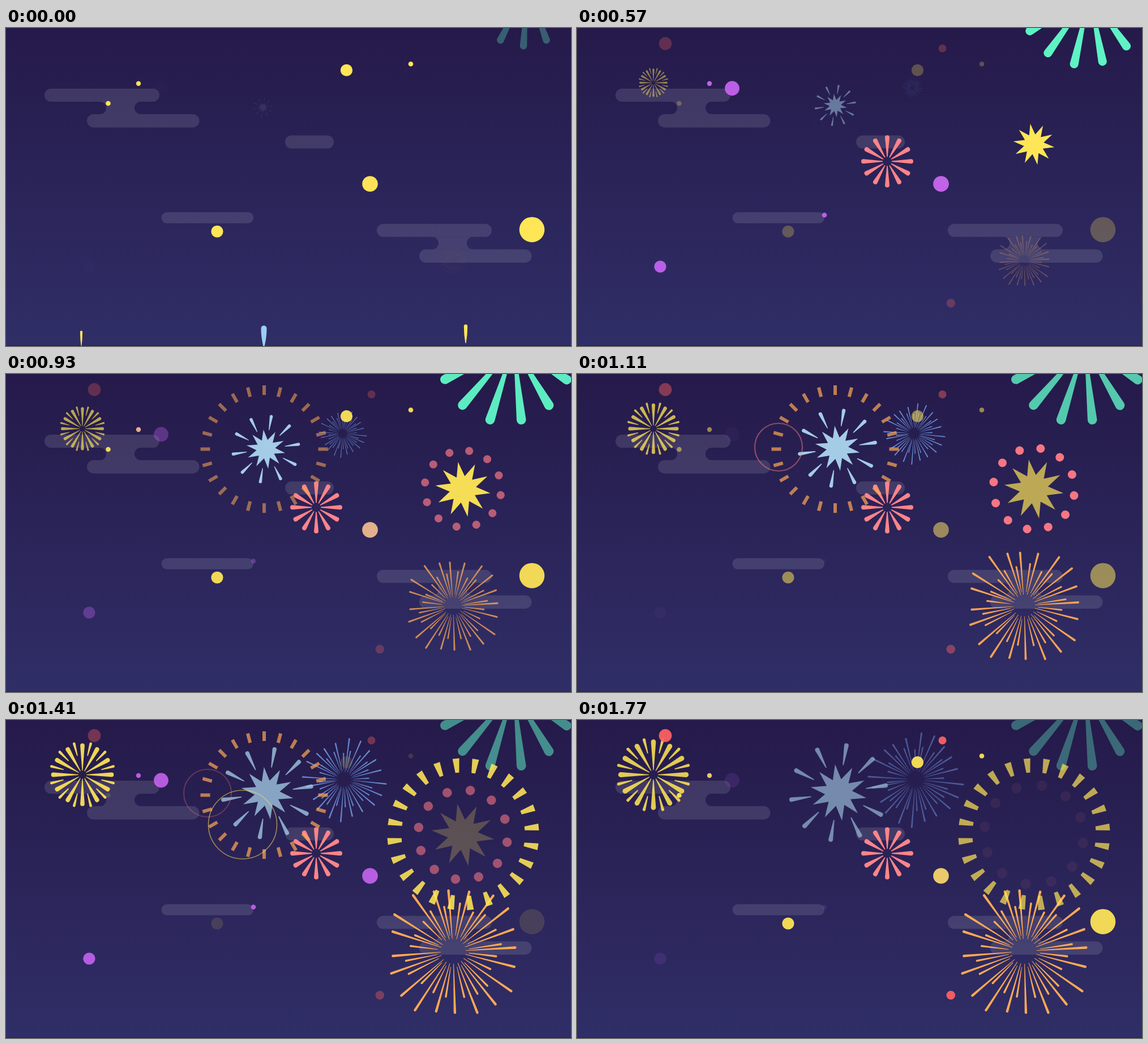
Animation, 998 px wide and 561 px high, one loop 1800 ms. Source, as an HTML page:

```html
<!DOCTYPE html>
<html lang="en">
<head>
<meta charset="utf-8">
<title>Fireworks</title>
<style>
  html, body { margin: 0; width: 100%; height: 100%; overflow: hidden; background: #251a4a; }
  svg { display: block; width: 100vw; height: 100vh; }
</style>
</head>
<body>
<svg id="stage" viewBox="0 0 998 561" preserveAspectRatio="none">
  <defs>
    <linearGradient id="sky" x1="0" y1="0" x2="0" y2="1">
      <stop offset="0" stop-color="#251a4a"/>
      <stop offset="1" stop-color="#302e67"/>
    </linearGradient>
    <g id="cloud">
      <rect x="68" y="107" width="203" height="23" rx="11.5"/>
      <rect x="143" y="152" width="198.5" height="23.5" rx="11.7"/>
      <path d="M166 130A11 11 0 0 1 166 152H238A11 11 0 0 1 238 130Z"/>
    </g>
  </defs>
  <rect width="998" height="561" fill="url(#sky)"/>
  <rect y="560.3" width="998" height="0.7" fill="#1c1640"/>
  <g fill="#fff" opacity="0.12">
    <use href="#cloud"/>
    <use href="#cloud" x="587" y="238.5"/>
    <rect x="493" y="189.5" width="86" height="23" rx="11.5"/>
    <rect x="274.5" y="325" width="162.5" height="19.5" rx="9.7"/>
  </g>
</svg>
<script>
const LOOP = 1800, STEP = 30, NS = 'http://www.w3.org/2000/svg';
const stage = document.getElementById('stage');
const YELLOW = '#ffe656', ORANGE = '#ffa955', PINK = '#ff8087', RED = '#ff6362',
  PURPLE = '#c864f4', PALE = '#a8d1ea', BLUE = '#7aaaf6', TEAL = '#62fac9';

// Timing
const mix = (a, b, u) => a + (b - a) * u;
const ramp = (t, t0, t1) => Math.min(1, Math.max(0, (t - t0) / (t1 - t0)));
const easeOut = (u, power = 1.8) => 1 - (1 - u) ** power;
const fade = (t, in0, in1, out0, out1, rest = 0) =>
  ramp(t, in0, in1) * mix(1, rest, ramp(t, out0, out1));
const blink = (t, period) => 1 - Math.abs(1 - 2 * (t / period % 1));

// Shapes, drawn around the origin
const spread = (n, start, make) =>
  Array.from({ length: n }, (_, i) => make(start + i * 360 / n)).join('');

function polar(angle) {
  const a = angle * Math.PI / 180, c = Math.cos(a), s = Math.sin(a);
  return (r, off = 0) => [r * c - off * s, r * s + off * c];
}

// Tapered ray; w0 and w1 are half widths at the inner and outer end.
function ray(angle, r0, r1, w0, w1, round = true) {
  const p = polar(angle), end = round ? r1 - w1 : r1;
  const cap = round ? `A${w1} ${w1} 0 0 1 ` : 'L';
  return `M${p(r0, -w0)}L${p(end, -w1)}${cap}${p(end, w1)}L${p(r0, w0)}Z`;
}

// Ray of the tilted burst: its tip lies on a circle, its root off the centre.
function tiltedRay(angle, radius, rootX, rootY, w) {
  const [x, y] = polar(angle)(radius);
  const dx = x - rootX, dy = y - rootY;
  const local = ray(Math.atan2(dy, dx) * 180 / Math.PI, 10, Math.hypot(dx, dy) + w, 1.5, w);
  return local.replace(/(-?[\d.]+(?:e-?\d+)?),(-?[\d.]+(?:e-?\d+)?)/g,
    (_, px, py) => [+px + rootX, +py + rootY]);
}

function disc(angle, r, size) {
  const p = polar(angle), arc = `A${size} ${size} 0 0 1 `;
  return `M${p(r - size)}${arc}${p(r + size)}${arc}${p(r - size)}Z`;
}

const star = (points, radius, inner, start) =>
  'M' + Array.from({ length: points * 2 }, (_, i) =>
    polar(start + i * 180 / points)(i % 2 ? inner : radius)).join('L') + 'Z';

// Long rays reach further on the diagonals, with short ones between them.
function sparkler(seed) {
  const jitter = size => {
    seed = seed * 16807 % 2147483647;
    return (seed / 2147483647 - .5) * size;
  };
  const long = a => ray(a + jitter(5), 22, 118 - 8 * Math.cos(a * Math.PI / 45) + jitter(8), .4, 2.2);
  const short = a => ray(a + jitter(5), 28, 82 + jitter(16), .4, 1.8);
  return spread(20, -92, long) + spread(20, -83, short);
}

// Parts: a path with a pose that depends on the time
const parts = [];
function part(d, fill, pose, attrs = {}) {
  const el = document.createElementNS(NS, 'path');
  Object.entries({ d, fill, ...attrs }).forEach(([k, v]) => el.setAttribute(k, v));
  parts.push({ el: stage.appendChild(el), pose });
}

function rocket(x, from, to, length, w, fill) {
  const d = `M${-w} ${w}A${w} ${w} 0 0 1 ${w} ${w}Q${w} ${length * .55} ${w * .2} ${length}H${-w * .2}Q${-w} ${length * .55} ${-w} ${w}Z`;
  part(d, fill, t => ({
    x, y: mix(from, to, easeOut(ramp(t, 0, 330))),
    a: 1 - ramp(t, 180, 345)
  }));
}
rocket(133, 534, 138, 27, 2.1, YELLOW);
rocket(455.5, 525, 160, 37, 5, '#9ccff5');
rocket(812, 523, 231, 33, 3.2, YELLOW);
rocket(548, 572, 255, 28, 3, PINK);

part(spread(13, 0, a => tiltedRay(a, 100, 0, 0, 7.3)), 'none', () => ({ a: 0 }));
parts.pop().el.remove();

// Tilted teal burst in the top right corner
part(spread(13, 104, a => tiltedRay(a, 115, 14, -19, 8.3)), TEAL, t => {
  const u = ramp(t, 0, 900);
  return {
    x: mix(914, 883, u), y: mix(-56, -31, u), rot: mix(-14, 0, u), s: mix(.76, 1, u),
    a: mix(.3, 1, ramp(t, 0, 600)) * mix(1, .35, ramp(t, 860, 1600))
  };
});

const sparks = sparkler(11);
part(sparks, ORANGE, t => ({
  x: 790, y: mix(411, 408, ramp(t, 350, 1260)),
  s: mix(.21, 1, ramp(t, 350, 1260)),
  a: mix(.1, 1, ramp(t, 330, 1150))
}));
part(sparks, BLUE, t => ({
  x: mix(592, 598, ramp(t, 450, 1560)), y: 105, rot: -28.5,
  s: mix(.08, .68, ramp(t, 450, 1560)),
  a: mix(.04, .95, ramp(t, 420, 1250)) * mix(1, .46, ramp(t, 1290, 1620))
}));

// Small yellow burst
part(spread(12, 0, a => ray(a, 8, 61, .6, 4.3)) + spread(12, 15, a => ray(a, 38, 65, .8, 2.6)), YELLOW, t => ({
  x: 135, y: 96.5,
  s: mix(.25, 1.02, ramp(t, 300, 1600)),
  a: mix(.38, 1, ramp(t, 330, 1560)) * fade(t, 210, 330, 1620, 1800, .84)
}));

// Pink burst
part(spread(12, 0, a => ray(a, 8, 46, .7, 4)), '#ff8489', t => ({
  x: 548, y: mix(238, 235.3, ramp(t, 330, 570)),
  s: mix(.18, 1, ramp(t, 210, 570)),
  a: ramp(t, 210, 510)
}));

// Pale star with flying arms
part(star(10, 50, 24, 11) + spread(10, -8.5, a => ray(a, 49, 88, .8, 4)), PALE, t => {
  const u = easeOut(ramp(t, 330, 1770));
  return {
    x: mix(454, 462, u), y: mix(140, 128, u), s: mix(.19, 1, u),
    a: mix(.1, .98, ramp(t, 330, 850)) * mix(1, .62, ramp(t, 1110, 1600))
  };
});

// Orange dashed ring
part(spread(24, 0, a => ray(a, 95.5, 112.5, 3, 3, false)), ORANGE, t => ({
  x: 456, y: 132.5, a: .7 * fade(t, 600, 1020, 1560, 1765)
}));

// Yellow star, its ring of dots and its outer ring
part(star(10, 50, 24, 8), YELLOW, t => {
  const u = easeOut(ramp(t, 180, 1580), 2.3);
  return {
    x: 807, y: mix(208, 202.5, u), s: mix(.3, 1.12, u),
    a: fade(t, 150, 510, 900, 1570)
  };
});
part(spread(12, 9.5, a => disc(a, 72, 7.5)), '#ff7a86', t => ({
  x: 807, y: 202.5, s: mix(.83, 1.22, ramp(t, 600, 1770)), a: fade(t, 660, 1060, 1080, 1830)
}));
part(spread(24, -5.5, a => ray(a, 109, 134, 3.4, 6, false)), YELLOW, t => ({
  x: 807.5, y: 201.5, a: .88 * fade(t, 1120, 1290, 1560, 1800, .77)
}));

// Thin rings
const outline = (stroke, width) => ({ stroke, 'stroke-width': width });
part(disc(0, 0, 42), 'none', t => ({ x: 356, y: 129, a: .55 * fade(t, 930, 1140, 1200, 1600) }), outline(PINK, 2.2));
part(disc(0, 0, 60.5), 'none', t => ({ x: 418, y: 184.5, a: .78 * fade(t, 1110, 1250, 1290, 1650) }), outline(YELLOW, 1.7));

// Blinking dots
const dots = (fill, alpha, list) => list.forEach(([x, y, r]) =>
  part(disc(0, 0, r), fill, t => ({ x, y, a: alpha(t) })));
const shared = [[234, 98, 4.2], [643, 275, 13.8]];
dots(YELLOW, t => 1 - blink(t, 900), [
  ...shared, [180.5, 133, 4.3], [601.5, 74.5, 10.6], [715, 63.5, 4.3], [373, 359, 10.6], [929, 355.7, 22.3]
]);
dots(RED, t => blink(t, 500), [[156, 27.5, 11.4], [645.5, 36, 7], [660.3, 485.5, 7.8]]);
dots(PURPLE, t => fade(t, -10, 480, 520, 1140) + fade(t, 1120, 1450, 1560, 1800), [
  ...shared, [274, 106.5, 12.9], [437, 330, 4.3], [147, 421, 10.6]
]);

function draw(t) {
  for (const { el, pose } of parts) {
    const { x, y, s = 1, rot = 0, a } = pose(t);
    el.setAttribute('transform', `translate(${x} ${y}) rotate(${rot}) scale(${s})`);
    el.setAttribute('opacity', a);
  }
}

let start;
function frame(now) {
  start ??= now;
  draw(Math.floor(((now - start) % LOOP) / STEP) * STEP);
  requestAnimationFrame(frame);
}
draw(0);
requestAnimationFrame(frame);
</script>
</body>
</html>
```
